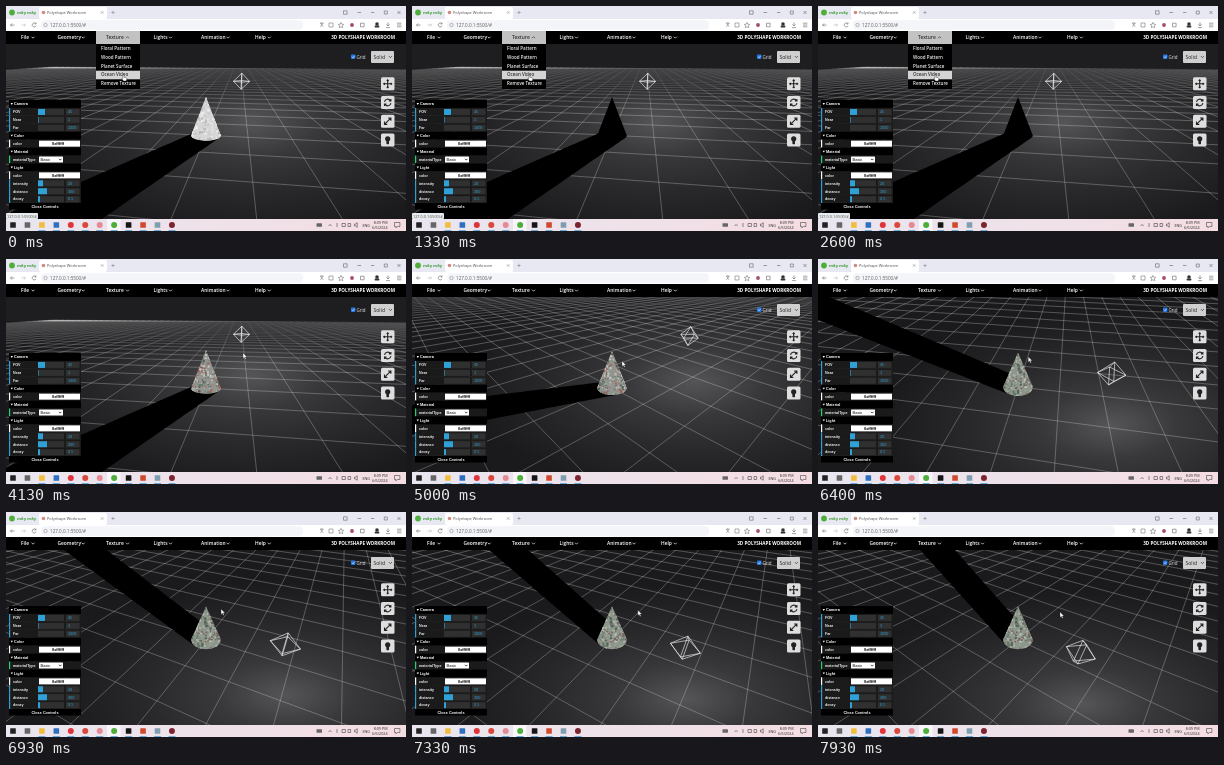
An HTML page with a canvas that plays this animation: 400 by 225 pixels, repeating every 8000 ms.

```html
<!DOCTYPE html>
<html lang="en">
<head>
<meta charset="utf-8">
<title>3D scene editor</title>
<style>
html, body { margin: 0; width: 100%; height: 100%; overflow: hidden; background: #000; }
canvas, svg { position: absolute; left: 0; top: 0; width: 100vw; height: 100vh; display: block; }
text { white-space: pre; }
.ui { font-family: "Open Sans", "Noto Sans", sans-serif; }
.os { font-family: "Noto Sans", "Open Sans", sans-serif; }
.gui { font-family: "Liberation Sans", Arial, sans-serif; }
</style>
</head>
<body>
<canvas id="scene"></canvas>
<svg id="ui" viewBox="0 0 400 225" preserveAspectRatio="none"></svg>
<script>
const LOOP = 8000, RAD = Math.PI / 180;
const canvas = document.getElementById('scene'), ctx = canvas.getContext('2d');

// ---------- timing ----------
// time, azimuth, pitch
const CAMERA = [[4530, 8, 17], [5000, 48, 26], [5600, 77, 30], [6930, 116.4, 36], [7930, 127.4, 35.5]];
const POINTER = [[3000, 117, 69], [3600, 237, 94], [4530, 237, 94], [5000, 210, 102],
                 [5600, 203, 99], [6930, 215, 97], [7930, 242, 100]];
const CONE_BLACK = 270, CONE_VIDEO = 2730, MENU_CLOSE = 3130;

function sample(steps, t) {
  if (t <= steps[0][0]) return steps[0].slice(1);
  for (let i = 1; i < steps.length; i++) {
    const [a, b] = [steps[i - 1], steps[i]];
    if (t <= b[0]) {
      const k = (t - a[0]) / (b[0] - a[0]);
      return a.slice(1).map((v, j) => v + (b[j + 1] - v) * k);
    }
  }
  return steps[steps.length - 1].slice(1);
}

function random(seed) {
  return () => {
    seed = (seed * 1664525 + 1013904223) >>> 0;
    return seed / 4294967296;
  };
}

// ---------- 3D scene ----------
const CX = 200, CY = 119, FOCAL = 227;
const FLOOR = -11, APEX = 28.2, RADIUS = 15;
const CELL = 42, CELLS = 30, EXTENT = CELL * CELLS;
const LIGHT = { angle: 156 * RAD, dist: 84, y: 35.5, size: 10 };
const SHADOW_LENGTH = 600, SHADOW_SPREAD = 1 / 300;

const rnd = random(7);
const specks = Array.from({ length: 420 }, () => ({
  angle: rnd() * 2 * Math.PI,
  h: 1 - Math.sqrt(rnd()),
  size: 0.8 + rnd() * 1.6,
  tone: rnd()
}));
const MARBLE = ['#d6d6d6', '#f0f0f0', '#b8b8b8', '#e4e4e4', '#c8c8c8'];
const REEF = ['#92958f', '#b9aea8', '#a0655f', '#657c6e', '#c4c9c3', '#505a58'];
const KELP = ['#8d968a', '#a9aea4', '#62796a', '#7a615e', '#b6bfb3', '#54605a'];

function makeView(azimuth, pitch) {
  const ca = Math.cos(azimuth * RAD), sa = Math.sin(azimuth * RAD);
  const cp = Math.cos(pitch * RAD), sp = Math.sin(pitch * RAD);
  const depth = (x, y, z) => FOCAL - (z * ca + x * sa) * cp - y * sp;
  const project = (x, y, z) => {
    const k = FOCAL / depth(x, y, z), w = z * ca + x * sa;
    return [CX + (x * ca - z * sa) * k, CY - (y * cp - w * sp) * k];
  };
  return { azimuth: azimuth * RAD, depth, project, horizon: CY - FOCAL * sp / cp,
           edge: CY + FOCAL * (-FLOOR * cp - EXTENT * sp) / (FOCAL + EXTENT * cp - FLOOR * sp) };
}

function trace(points) {
  ctx.beginPath();
  points.forEach((p, i) => i ? ctx.lineTo(...p) : ctx.moveTo(...p));
}

function addLine(view, a, b) {
  const near = 12;
  const da = view.depth(...a), db = view.depth(...b);
  if (da < near && db < near) return;
  const k = (near - da) / (db - da);
  const cut = a.map((v, i) => v + (b[i] - v) * k);
  ctx.moveTo(...view.project(...(da < near ? cut : a)));
  ctx.lineTo(...view.project(...(db < near ? cut : b)));
}

function drawFloor(view, lx, lz) {
  const top = Math.max(25, view.edge), [gx, gy] = view.project(lx, FLOOR, lz);
  ctx.save();
  ctx.beginPath();
  ctx.rect(0, top, 400, 213 - top);
  ctx.clip();
  ctx.translate(gx + 12, gy + 5);
  ctx.scale(1, 0.5);
  const glow = ctx.createRadialGradient(0, 0, 0, 0, 0, 230);
  glow.addColorStop(0, '#555557');
  glow.addColorStop(0.3, '#38383a');
  glow.addColorStop(0.6, '#29292b');
  glow.addColorStop(1, '#1a1a1c');
  ctx.fillStyle = glow;
  ctx.fillRect(-500, -500, 1000, 1000);
  ctx.restore();
}

function drawShadow(view, lx, lz) {
  const dx = -lx / LIGHT.dist, dz = -lz / LIGHT.dist, left = [], right = [];
  for (let s = 0; s <= SHADOW_LENGTH; s += 5) {
    const r = RADIUS * (1 + s * SHADOW_SPREAD);
    const a = [dx * s - dz * r, FLOOR, dz * s + dx * r];
    const b = [dx * s + dz * r, FLOOR, dz * s - dx * r];
    if (Math.min(view.depth(...a), view.depth(...b)) < 14) break;
    left.push(view.project(...a));
    right.unshift(view.project(...b));
  }
  trace(left.concat(right));
  ctx.fillStyle = '#000';
  ctx.fill();
}

function drawGrid(view) {
  ctx.beginPath();
  for (let i = -CELLS; i <= CELLS; i++) {
    const c = i * CELL;
    addLine(view, [c, FLOOR, -EXTENT], [c, FLOOR, EXTENT]);
    addLine(view, [-EXTENT, FLOOR, c], [EXTENT, FLOOR, c]);
  }
  ctx.strokeStyle = 'rgba(235,235,235,.55)';
  ctx.lineWidth = 0.5;
  ctx.stroke();
  const haze = ctx.createLinearGradient(0, view.horizon + 10, 0, view.horizon + 55);
  haze.addColorStop(0, 'rgba(26,26,28,.7)');
  haze.addColorStop(1, 'rgba(26,26,28,0)');
  ctx.fillStyle = haze;
  ctx.fillRect(0, view.edge, 400, view.horizon + 55 - view.edge);
}

function drawCone(view, t) {
  const at = (angle, h) => view.project(
    Math.sin(angle) * RADIUS * (1 - h), FLOOR + (APEX - FLOOR) * h, Math.cos(angle) * RADIUS * (1 - h));
  const outline = [at(0, 1)];
  for (let d = -98; d <= 98; d += 7) outline.push(at(view.azimuth + d * RAD, 0));
  trace(outline);
  if (t >= CONE_BLACK && t < CONE_VIDEO) {
    ctx.fillStyle = '#000';
    ctx.fill();
    return;
  }
  const tones = t < CONE_BLACK ? MARBLE : t < 6200 ? REEF : KELP;
  ctx.fillStyle = tones[0];
  ctx.fill();
  ctx.save();
  ctx.clip();
  for (const s of specks) {
    if (Math.cos(s.angle - view.azimuth) < -0.1) continue;
    const [x, y] = at(s.angle, s.h);
    ctx.fillStyle = tones[Math.floor(s.tone * tones.length)];
    ctx.fillRect(x - s.size / 2, y - s.size / 2, s.size, s.size);
  }
  ctx.restore();
}

function drawLight(view, lx, lz) {
  const r = LIGHT.size, y = LIGHT.y;
  const ring = [[r, 0], [0, r], [-r, 0], [0, -r]].map(([x, z]) => [lx + x, y, lz + z]);
  ctx.beginPath();
  ring.forEach((p, i) => {
    addLine(view, p, ring[(i + 1) % 4]);
    addLine(view, p, [lx, y + r, lz]);
    addLine(view, p, [lx, y - r, lz]);
  });
  ctx.strokeStyle = '#eee';
  ctx.lineWidth = 0.65;
  ctx.stroke();
}

function drawScene(t) {
  const view = makeView(...sample(CAMERA, t));
  const lx = LIGHT.dist * Math.sin(LIGHT.angle), lz = LIGHT.dist * Math.cos(LIGHT.angle);
  ctx.setTransform(canvas.width / 400, 0, 0, canvas.height / 225, 0, 0);
  ctx.fillStyle = '#1e1e20';
  ctx.fillRect(0, 0, 400, 225);
  drawFloor(view, lx, lz);
  drawGrid(view);
  drawShadow(view, lx, lz);
  drawCone(view, t);
  drawLight(view, lx, lz);
}

// ---------- interface ----------
const rect = (x, y, w, h, fill, r = 0) =>
  `<rect x="${x}" y="${y}" width="${w}" height="${h}" rx="${r}" fill="${fill}"/>`;
const dot = (x, y, r, fill) => `<circle cx="${x}" cy="${y}" r="${r}" fill="${fill}"/>`;
const line = (d, color = '#444', w = 0.7) =>
  `<path d="${d}" fill="none" stroke="${color}" stroke-width="${w}"/>`;
const text = (x, y, str, size, fill, cls = 'ui', weight = 400, anchor = 'start') =>
  `<text x="${x}" y="${y}" font-size="${size}" fill="${fill}" class="${cls}" font-weight="${weight}" text-anchor="${anchor}">${str}</text>`;

function browser() {
  return rect(0, 0, 400, 13, '#e7e8f2') + rect(33, 1, 68, 12, '#fff', 2) + rect(0, 13, 400, 12, '#fff') +
    dot(6, 6.5, 2.9, '#4fae3a') + text(11, 8.3, 'mây mây', 4.2, '#3f9d35', 'os', 600) +
    dot(37.5, 6.5, 1.8, '#d08a80') + text(41, 8, 'Polyshape Workroom', 3.9, '#555', 'os') +
    line('M95 5.3l2.4 2.4m0-2.4l-2.4 2.4M105.3 6.5h3.4m-1.7-1.7v3.4', '#777', 0.5) +
    line('M337.5 4.8h3.6v3.4h-3.6zM351.5 6.5h3.6M365 6.5h3.4M378.3 5h3v3h-3zM391.5 5l3 3m0-3l-3 3', '#666', 0.6) +
    rect(35, 14.2, 262, 9.6, '#f4f5f9', 4) +
    line('M8.5 19H4.5m1.6-1.6L4.5 19l1.6 1.6', '#666', 0.6) + line('M15.5 19h4m-1.6-1.6l1.6 1.6-1.6 1.6', '#bbb', 0.6) +
    line('M29.8 17.7a2 2 0 1 0 .3 2M30 16.5v1.5h-1.5', '#666', 0.6) +
    `<circle cx="39.5" cy="19" r="1.7" fill="none" stroke="#777" stroke-width=".5"/>` +
    text(44, 20.7, '127.0.0.1:5500/#', 4.6, '#666', 'os') +
    line('M314 17.2h3.6m-1.8-1v1m-1.4 0l2.8 3.6m0-3.6l-2.8 3.6M323 21v-4h4m0 0v4h-4M335 16.4l.8 1.8 2 .2-1.5 1.3.5 2-1.8-1-1.8 1 .5-2-1.5-1.3 2-.2z', '#777', 0.6) +
    dot(346, 19, 1.9, '#a34d62') + line('M354.5 17.2h3.6v3.6h-3.6z', '#666', 0.6) +
    dot(371, 18, 1.8, '#333') + rect(368.6, 19.6, 4.8, 1.9, '#333', 0.8) +
    line('M382 16.4v3.6m-1.6-1.6L382 20l1.6-1.6M380 21.6h4M391 17.2h4.4m-4.4 1.8h4.4m-4.4 1.8h4.4', '#666', 0.6);
}

const MENUS = [['File', 15, 27], ['Geometry', 51.5, 77.2], ['Texture', 100, 121.5], ['Lights', 147.5, 164.5], ['Animation', 195, 222], ['Help', 249, 263.3]];
const chevron = (x, up, color) =>
  line(up ? `M${x - 1.5} 32.2l1.5-1.5 1.5 1.5` : `M${x - 1.5} 30.7l1.5 1.5 1.5-1.5`, color, 0.7);
const menuLabel = ([name, x, mark], color = '#fff', up = false) =>
  text(x, 33, name, 4.9, color, 'ui', 600) + chevron(mark, up, color);

function navbar() {
  return rect(0, 25, 400, 13, '#000') + MENUS.map(m => menuLabel(m)).join('') +
    text(389, 33, '3D POLYSHAPE WORKROOM', 4.6, '#fff', 'ui', 700, 'end');
}

function dropdown() {
  const items = ['Floral Pattern', 'Wood Pattern', 'Planet Surface', 'Ocean Video', 'Remove Texture'];
  return `<g id="menu">` + rect(90, 25, 44, 13, '#c2c2c2') + menuLabel(MENUS[2], '#333', true) +
    rect(90, 38, 44, 45, '#000') + rect(90, 64.7, 44, 8.6, '#d4d4d4') +
    items.map((s, i) => text(95, 44 + i * 8.8, s, 4.5, i === 3 ? '#333' : '#eee', 'ui', 600)).join('') +
    rect(0, 207, 32, 6, '#e8ebee', 1) + text(1, 211.6, '127.0.0.1:5500/#', 3.8, '#555', 'os') + `</g>`;
}

function toolButtons() {
  const icons = ['M-4 0h8M0-4v8M-3-1l-1 1 1 1M3-1l1 1-1 1M-1-3l1-1 1 1M-1 3l1 1 1-1',
    'M-3.2-.6a3.3 3.3 0 0 1 6-1.3M3.2-3.6v2H1.2M3.2.6a3.3 3.3 0 0 1-6 1.3M-3.2 3.6v-2h2',
    'M-3 3l6-6M.4-3.2h2.8V-.4M-.4 3.2h-2.8V.4'];
  const button = (y, icon) => rect(375, y - 6.5, 13.5, 13, '#dedede', 1.5) +
    `<g transform="translate(381.7 ${y})">${icon}</g>`;
  return icons.map((d, i) => button(77.8 + i * 18.7, line(d, '#222', 1.1))).join('') +
    button(134, dot(0, -1.2, 2.6, '#222') + rect(-1.3, 0.5, 2.6, 3.7, '#222', 0.6)) +
    rect(345, 48.6, 4.4, 4.4, '#2479e8', 0.8) + line('M346 50.8l1 1 1.7-2', '#fff', 0.6) +
    text(350.5, 52.5, 'Grid', 4.5, '#eee') +
    rect(365, 45, 23, 12, '#cfcfcf', 1) + text(367.5, 52.8, 'Solid', 5.1, '#222') +
    line('M383 50.2l1.4 1.4 1.4-1.4', '#222', 0.7);
}

const PANEL = [
  ['head', 'Camera'], ['num', 'FOV', 7, '45'], ['num', 'Near', 0.6, '1'], ['num', 'Far', 0, '1000'],
  ['head', 'Color'], ['color', 'color'],
  ['head', 'Material'], ['pick', 'materialType'],
  ['head', 'Light'], ['color', 'color'], ['num', 'intensity', 5, '20'], ['num', 'distance', 9, '300'], ['num', 'decay', 2, '0.5']
];

function panel() {
  const h = 7.93, edge = { num: '#2fa1d6', color: '#fff', pick: '#1ed36f' };
  const label = (x, y, s, fill, size = 3.8, weight = 400) => text(x, y + 5.3, s, size, fill, 'gui', weight);
  const rows = PANEL.map(([kind, name, fill, value], i) => {
    const y = 94 + i * h;
    if (kind === 'head')
      return rect(3, y, 72, h, '#000') + `<path d="M4.6 ${y + 3.1}h2.4l-1.2 1.8z" fill="#fff"/>` + label(8, y, name, '#fff', 3.8, 700);
    let row = rect(3, y, 72, h, '#1a1a1a') + rect(3, y + h - 0.3, 72, 0.3, '#2c2c2c') +
      rect(3, y, 1.2, h, edge[kind]) + label(7, y, name, '#eee', 3.7, 700);
    if (kind === 'num')
      row += rect(32, y + 1, 26, 6, '#303030') + rect(32, y + 1, fill, 6, '#2fa1d6') +
        rect(60, y + 1, 13.5, 6, '#303030') + label(62, y, value, '#2fa1d6');
    if (kind === 'color')
      row += rect(33, y + 1, 41, 6, '#fff') + label(46, y, '0xffffff', '#000', 3.9, 700);
    if (kind === 'pick')
      row += rect(33, y + 1, 24, 6, '#fff', 0.6) + label(34.5, y, 'Basic', '#000', 4) +
        line(`M53 ${y + 3.3}l1.2 1.3 1.2-1.3`, '#000', 0.7);
    return row;
  }).join('');
  return rows + rect(3, 197, 72, 6.5, '#000') +
    text(39, 201.5, 'Close Controls', 3.8, '#fff', 'gui', 700, 'middle');
}

function taskbar() {
  const apps = ['#222', '#666', '#f0bd3d', '#2f6fc0', '#e0343a', '#d9483b', '#e58a94', '#4fae3a', '#151515', '#cf4a2c', '#7f9fb0', '#7b2430'];
  const square = [0, 1, 2, 3, 8, 9, 10];
  const icon = (color, i) => {
    const x = 7 + i * 14.45;
    return square.includes(i) ? rect(x - 2.8, 216.2, 5.6, 5.6, color, 0.5) : dot(x, 219, 3, color);
  };
  return `<linearGradient id="bar"><stop stop-color="#e9e6f0"/><stop offset="1" stop-color="#f4dde2"/></linearGradient>` +
    rect(0, 213, 400, 12, 'url(#bar)') + rect(101, 213, 13.5, 12, '#f8f6fa') +
    apps.map(icon).join('') +
    apps.map((_, i) => i > 1 ? rect(3.5 + i * 14.45, 224.2, 7, 0.8, '#4a9bd8') : '').join('') +
    rect(310.5, 217.3, 5.5, 3.4, '#666', 0.4) +
    line('M322.5 220l1.6-1.6 1.6 1.6M331 217v4M336 217.5h3.4v3H336zM342 217.5v3h2.6v-3zM348.5 218h1.2l1.5-1.3v4.6l-1.5-1.3h-1.2z', '#444', 0.6) +
    text(356.5, 220.6, 'ENG', 3.7, '#333', 'os') +
    text(381.5, 218.2, '8:09 PM', 3.7, '#333', 'os', 400, 'end') +
    text(381.5, 223.2, '6/6/2024', 3.7, '#333', 'os', 400, 'end') +
    line('M388.5 216.5h5.4v4h-2.6l-1.4 1.4v-1.4h-1.4z', '#444', 0.6);
}

const arrow = '<path id="arrow" d="M0 0v5.4l1.3-1.1.9 1.9 1-.4-.9-1.9h1.7z" fill="#fff" stroke="#222" stroke-width=".35"/>';
const hand = '<path id="hand" d="M-.1 0q.7-.6 1.1.2v2l2.4.6q.6.3.4 1.2l-.6 2H.5l-1.8-2.4q.2-.8 1.2-.1z" fill="#fff" stroke="#222" stroke-width=".4"/>';

document.getElementById('ui').innerHTML = browser() + navbar() + dropdown() + toolButtons() +
  panel() + taskbar() + `<g id="pointer">${arrow}${hand}</g>`;

const part = Object.fromEntries(['menu', 'pointer', 'arrow', 'hand'].map(id => [id, document.getElementById(id)]));
const show = (el, on) => el.setAttribute('visibility', on ? 'visible' : 'hidden');

function drawInterface(t) {
  const open = t < MENU_CLOSE;
  show(part.menu, open);
  show(part.hand, open);
  show(part.arrow, !open);
  part.pointer.setAttribute('transform', `translate(${sample(POINTER, t).join(' ')})`);
}

// ---------- loop ----------
function resize() {
  const ratio = window.devicePixelRatio || 1;
  canvas.width = Math.round(innerWidth * ratio);
  canvas.height = Math.round(innerHeight * ratio);
}

const start = performance.now();
function frame() {
  const t = (performance.now() - start) % LOOP;
  drawScene(t);
  drawInterface(t);
  requestAnimationFrame(frame);
}

addEventListener('resize', resize);
resize();
frame();
</script>
</body>
</html>
```
